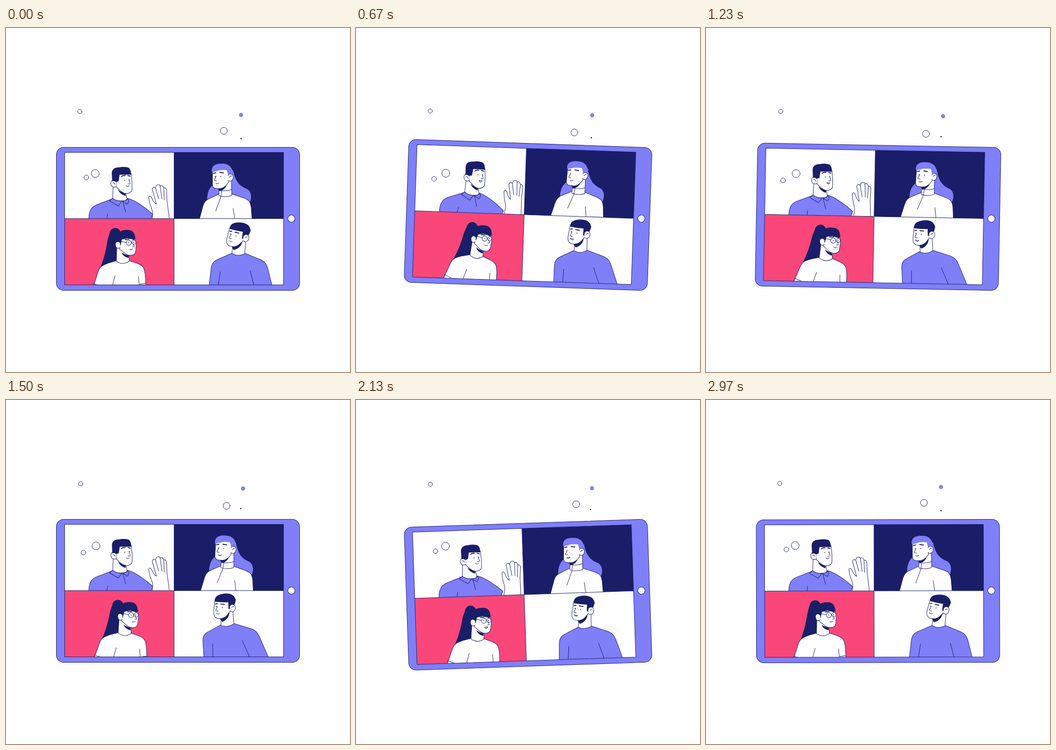
Write an HTML page that moves like this. It is 748x748 px and loops after 3 s.

```html
<!DOCTYPE html>
<html lang="en">
<head>
<meta charset="utf-8">
<title>Video call</title>
<style>
  html, body { margin: 0; width: 100%; height: 100%; overflow: hidden; background: #fefefe; }
  svg { display: block; width: 100vw; height: 100vh; stroke-linecap: round; stroke-linejoin: round; }
  .line { fill: none; stroke: #1a1e68; stroke-width: 1; }
  .white { fill: #fefefe; stroke: #1a1e68; stroke-width: 1; }
  .violet { fill: #7f7ff8; stroke: #1a1e68; stroke-width: 1; }
  .navy { fill: #1a1e68; }
  .lilac { fill: #7f7ff8; }
  .red { fill: #fa4779; }
  .paper { fill: #fefefe; }
  .brow { fill: none; stroke: #1a1e68; stroke-width: 2; }
</style>
</head>
<body>
<svg viewBox="0 0 748 748">
  <defs>
    <clipPath id="tl"><path d="M127.5 270.5H365.5V414.5H127.5Z"/></clipPath>
    <clipPath id="tr"><path d="M365.5 270.5H603.5V414.5H365.5Z"/></clipPath>
    <clipPath id="bl"><path d="M127.5 414.5H365.5V558.5H127.5Z"/></clipPath>
    <clipPath id="br"><path d="M365.5 414.5H603.5V558.5H365.5Z"/></clipPath>
  </defs>

  <g id="tablet">
    <rect class="violet" x="109.5" y="259.5" width="529" height="311" rx="16"/>
    <path class="paper" d="M127.5 270.5H603.5V558.5H127.5Z"/>
    <path class="navy" d="M365.5 270.5H603.5V414.5H365.5Z"/>
    <path class="red" d="M127.5 414.5H365.5V558.5H127.5Z"/>

    <g clip-path="url(#tl)">
      <g id="host">
        <path class="violet" d="M179 440L180 412C181 396 186 389 198 384L232 371H267C280 375 302 389 319 405L314 418V440Z"/>
        <path class="line" d="M221 404L218.500 420M254 377L260 400"/>
        <path class="white" d="M233 342L232 371Q240 377 252 376Q262 376 263 371L260 355Z"/>
        <path class="violet" d="M232 370L225 376L244 387L252 376L264 383L267 377L265 370Q262 377 252 376Q239 377 232 370Z"/>
        <path class="navy" d="M243 351Q251 358 260 359L260 365Q248 362 243 351Z"/>
        <path class="white" d="M240 330V346L250 355Q256 360 262 360Q274 359 274 350L274 335L272 316H240Z"/>
        <path class="white" d="M240 333C235 328 228 330 228 338C228 344 233 348 240 345"/>
        <path class="line" d="M232 337Q235 335 237 340"/>
        <path class="navy" d="M231 334L230 316C230 307 236 303 246 303C254 301 263 302 267 304Q272 308 272 319H247L245 333L239 335Q234 331 231 334Z"/>
        <path class="brow" d="M251 323Q254 320 259 321M265 321L270 322"/>
        <path class="line" d="M267 329L270 338Q268 340 265 339"/>
        <circle class="navy" cx="258" cy="331" r="1"/><circle class="navy" cx="268" cy="330" r=".9"/>
        <path id="hostMouth" class="white"/>
      </g>
      <g id="hand">
        <path class="white" d="M314 460L319 404C319 396 315 390 313 383L310.500 371C309 365 314 364 316 368L320 376Q323 381 327 383L319 355C316 348 321 344 325 348Q326 340 331 341Q334 340 335 344Q340 340 343 348Q348 346 349 353L350 376L355 414L358 460Z"/>
        <path class="line" d="M325 348L332 372M335 344L339 372M343 348L344 374"/>
      </g>
    </g>

    <g clip-path="url(#tr)">
      <g id="guest">
        <path class="lilac" d="M449 342C440 350 436 362 438 382H529C536 368 533 355 524 350C508 344 499 334 494 310L460 300Z"/>
        <path class="white" d="M414 440L421 414L428 388C431 378 435 374 444 370L463 361H491L515 369C527 373 531 376 533 390L535 414L537 440Z"/>
        <path class="line" d="M467 368L456 398M494 392L498 420"/>
        <path class="white" d="M465 340L463 354V365Q478 369 491 364L490 330Z"/>
        <path class="line" d="M463 353Q478 356 491 351M469 354L467 368"/>
        <path class="navy" d="M460 348Q472 348 480 341Q477 351 465 355Z"/>
        <g id="guestHead">
          <path class="white" d="M449 309V340Q449 349 458 349H467Q477 347 484 335L486 306Z"/>
          <path class="lilac" d="M448 314C445 301 454 295 468 295C486 294 495 304 495 328L484 322L480 309Q464 308 459 311Z"/>
          <path class="white" d="M483 321C485 315 495 317 494 325C493 333 487 335 483 331"/>
          <path class="line" d="M486 325Q488 321 491 322"/>
          <path class="brow" d="M451 316L456 315M465 314L473 315"/>
          <path class="line" d="M457 322L453 331Q454 333 458 332"/>
          <g id="guestEyes"><circle class="navy" cx="455" cy="323" r="1"/><circle class="navy" cx="467" cy="323" r="1"/></g>
          <path id="guestMouth" class="white"/>
        </g>
      </g>
    </g>

    <g clip-path="url(#bl)">
      <g id="friend">
        <path class="navy" d="M225 447C227 433 242 431 248 441L253 475L242 515L203 526C215 498 218 478 221 460Z"/>
        <path class="white" d="M190 562L201 528C205 517 213 515 223 511L240 506H268L286 512C299 517 301 522 303 540L305 580H205Z"/>
        <path class="line" d="M190 556L206 561V575M237 539L229 570M288 540L291 575M291 557L304 555"/>
        <path class="white" d="M241 475L240 507Q254 517 268 507V488Z"/>
        <path class="navy" d="M251 488Q258 493 267 494V500Q255 498 251 488Z"/>
        <path class="white" d="M246 458V480L256 488Q264 495 272 494Q281 493 282 486L283 470L280 453H250Z"/>
        <path class="navy" d="M241 466C236 449 246 439 262 439C276 438 281 446 281 459Q270 460 265 457L252 460L249 473L242 472Z"/>
        <path class="white" d="M248 467C243 462 237 465 238 472C239 479 244 481 248 477"/>
        <path class="brow" d="M259 460L267 459M275 459L279 460"/>
        <path class="line" d="M248 464L261 466M276 468L279 475L275 476"/>
        <circle class="line" cx="267" cy="467" r="5.500"/><circle class="line" cx="278" cy="466" r="4.500"/>
        <circle class="navy" cx="267" cy="467" r="1"/><circle class="navy" cx="277" cy="466" r="1"/>
        <path id="friendMouth" class="white"/>
      </g>
    </g>

    <g clip-path="url(#br)">
      <path id="colleagueBody" class="violet" d="M438 590L442 558L446 522C448 510 453 506 463 502L491 490H520L549 502C563 507 567 513 570 526L578 558L586 590ZM466 530L459 575M531 528L543 575"/>
      <g id="colleagueHead">
        <path class="white" d="M494 470L491 490Q504 498 519 491L522 458Z"/>
        <path class="navy" d="M490 474Q504 475 514 464Q511 479 495 483Z"/>
        <path class="white" d="M487 433L480 459Q478 470 486 474Q499 478 508 470L516 462L519 438Z"/>
        <path class="navy" d="M487 437C486 426 496 422 510 423C524 424 531 430 532 441L528 450L520 451L516 459L513 457L515 443Q500 441 487 437Z"/>
        <path class="white" d="M517 452C521 446 530 450 528 458C526 466 519 467 515 462"/>
        <path class="line" d="M520 456Q523 453 525 455"/>
        <path class="brow" d="M487 442L491 442M498 444L506 446"/>
        <path class="line" d="M490 448L485 456Q487 459 490 458"/>
        <circle class="navy" cx="488" cy="448" r="1"/><circle class="navy" cx="500" cy="452" r="1"/>
        <path id="colleagueMouth" class="white"/>
      </g>
    </g>

    <path class="line" d="M127.500 270.500H603.500V558.500H127.500ZM365.500 270.500V558.500M127.500 414.500H603.500"/>
    <circle class="white" cx="620.500" cy="414.500" r="7.700"/>
  </g>
  <g id="bubbles"></g>
</svg>
<script>
const LOOP = 3000;
const el = id => document.getElementById(id);

// Smooth cyclic curve through [time, value] keys, flat at each peak.
function track(...keys) {
  const n = keys.length;
  const key = i => {
    const wrap = Math.floor(i / n);
    const [time, value] = keys[i - wrap * n];
    return [time + wrap * LOOP, value];
  };
  const slope = i => {
    const [a, b] = [key(i), key(i + 1)];
    return (b[1] - a[1]) / (b[0] - a[0]);
  };
  const tangent = i => {
    const a = slope(i - 1), b = slope(i);
    return a * b > 0 ? 2 * a * b / (a + b) : 0;
  };
  return t => {
    let i = n - 1;
    while (keys[i][0] > t) i--;
    const [t0, v0] = key(i), [t1, v1] = key(i + 1);
    const span = t1 - t0, s = (t - t0) / span, r = 1 - s;
    return v0 * r * r * (1 + 2 * s) + v1 * s * s * (3 - 2 * s)
      + span * s * r * (tangent(i) * r - tangent(i + 1) * s);
  };
}

const hostLean = track([0, 0], [670, 2.2], [1230, 0], [1770, .4], [2130, .6], [2630, 0]);
const guestLean = track([0, 0], [670, 1], [1230, .9], [1770, .9], [2130, .8], [2630, 0]);
const friendLean = track([0, 0], [670, 5.4], [1230, 4], [1770, .4], [2130, 3.4], [2630, 0]);
const hostTalk = track([0, 0], [400, 0], [670, 1], [1230, .9], [1500, 0]);
const guestTalk = track([0, 0], [1400, 0], [1770, 1], [2130, .8], [2400, 0]);
const friendTalk = track([0, 0], [1850, 0], [2130, 1], [2400, 0]);
const colleagueTalk = track([0, 0], [400, 0], [670, 1], [1230, 1], [1500, 0], [1850, 0], [2130, .7], [2400, 0]);
const guestBlink = track([0, 0], [520, 0], [640, 1], [700, 1], [820, 0], [2000, 0], [2100, 1], [2160, 1], [2280, 0]);

// Each drifts on a small ellipse: centre + cosine part + sine part.
const bubbles = [
  { r: 4.6, look: "line", x: [161.5, -1, 0], y: [181.8, -.4, -1.3] },
  { r: 4.5, look: "lilac", x: [513.2, -2.2, .7], y: [190.8, -1.7, -.7] },
  { r: 7.5, look: "line", x: [476.7, -2.9, -1.4], y: [226.8, -3.2, .8] },
  { r: 1.5, look: "navy", x: [510.8, .3, .9], y: [238.3, 2.3, -.2] },
  { r: 8.6, look: "line", x: [194.9, -.9, .6], y: [316.8, -.4, -.9] },
  { r: 5.1, look: "line", x: [171.5, 3.2, -2.3], y: [328.3, -3.4, .3] }
];
for (const b of bubbles) {
  b.node = document.createElementNS("http://www.w3.org/2000/svg", "circle");
  b.node.setAttribute("class", b.look);
  b.node.setAttribute("r", b.r);
  el("bubbles").append(b.node);
}

const transform = (id, value) => el(id).setAttribute("transform", value);
const rotate = (id, angle, x, y) => transform(id, `rotate(${angle} ${x} ${y})`);

function mouth(id, x, y, dx, dy, open) {
  const bend = 2.5 + 4 * open;
  const lip = 2.5 - 2 * open;
  el(id).setAttribute("d",
    `M${x} ${y}q${dx / 2} ${dy / 2 + bend} ${dx} ${dy}q${-dx / 2} ${lip - dy / 2} ${-dx} ${-dy}Z`);
}

// The head turns fully while the torso half turns, half slants.
function leanColleague(angle) {
  const lift = `translate(0 ${.4 * angle})`;
  transform("colleagueHead", `${lift} rotate(${angle} 503 628)`);
  transform("colleagueBody",
    `${lift} translate(503 628) rotate(${angle / 2}) skewX(${-angle / 2}) translate(-503 -628)`);
}

function draw(t) {
  const w = 2 * Math.PI * t / LOOP;
  const c = Math.cos(w), s = Math.sin(w);

  rotate("tablet", 2 * s, 620.5, 414.5);
  rotate("host", hostLean(t), 245, 440);
  rotate("hand", 4.3 - 5.2 * Math.cos(2 * w - .628), 335, 445);
  rotate("guest", 2 * guestLean(t), 478, 500);
  rotate("guestHead", 1.6 * guestLean(t), 475, 352);
  rotate("friend", friendLean(t), 248, 620);
  leanColleague(-4.9 * (1 - c) - 1.96 * s);

  mouth("hostMouth", 261, 343, 7, 0, hostTalk(t));
  mouth("guestMouth", 456, 338, 7, -1, guestTalk(t));
  mouth("friendMouth", 269, 481, 7, -1, friendTalk(t));
  mouth("colleagueMouth", 485, 462, 7, 2, colleagueTalk(t));
  transform("guestEyes",
    `translate(0 323) scale(1 ${1 - .7 * guestBlink(t)}) translate(0 -323)`);

  for (const { node, x, y } of bubbles) {
    node.setAttribute("cx", x[0] + x[1] * c + x[2] * s);
    node.setAttribute("cy", y[0] + y[1] * c + y[2] * s);
  }
}

const start = performance.now();
function frame(now) {
  draw(Math.max(0, now - start) % LOOP);
  requestAnimationFrame(frame);
}
draw(0);
requestAnimationFrame(frame);
</script>
</body>
</html>
```
